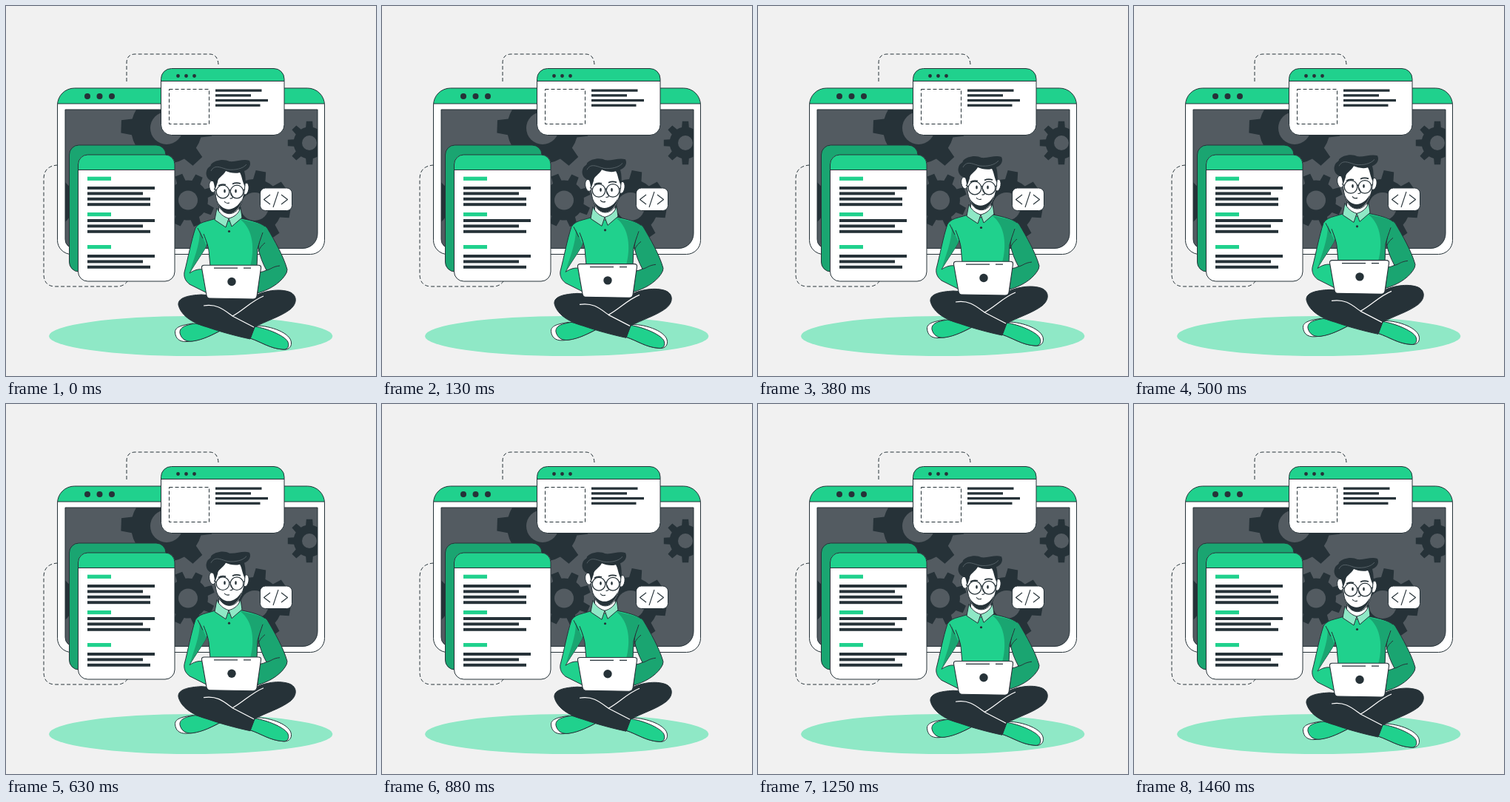
An HTML page with a canvas that plays this animation: 500x500 px, repeating every 1500 ms.

```html
<!DOCTYPE html>
<html lang="en">
<head>
<meta charset="utf-8">
<title>Developer at work</title>
<style>
  html, body { margin: 0; width: 100%; height: 100%; overflow: hidden; background: #f1f1f1; }
  canvas { display: block; width: 500px; height: 500px; }
</style>
</head>
<body>
<canvas id="stage"></canvas>
<script>
const DARK = '#263238', GREEN = '#20d18d', SHADE = '#1aa571', MINT = '#8fe8c6',
      GRAY = '#535b61', WHITE = '#fff', BACK = '#f1f1f1';
const LOOP = 1500, STEP = LOOP / 36, RISE = 10;

const canvas = document.getElementById('stage');
const ctx = canvas.getContext('2d');
const ratio = window.devicePixelRatio || 1;
canvas.width = canvas.height = 500 * ratio;

function paint(path, fill, stroke = DARK, width = 1) {
  if (fill) { ctx.fillStyle = fill; ctx.fill(path); }
  if (stroke) { ctx.strokeStyle = stroke; ctx.lineWidth = width; ctx.stroke(path); }
}
const shape = (d, fill, stroke, width) => paint(new Path2D(d), fill, stroke, width);
const line = (d, color = DARK, width = 1) => shape(d, null, color, width);

function oval(x, y, rx, ry, fill, stroke = null, width = 1, turn = 0) {
  const p = new Path2D();
  p.ellipse(x, y, rx, ry, turn, 0, Math.PI * 2);
  paint(p, fill, stroke, width);
}
const dot = (x, y, r, fill = DARK) => oval(x, y, r, r, fill);

function box(x, y, w, h, radius) {
  const p = new Path2D();
  p.roundRect(x, y, w, h, radius);
  return p;
}

function bar(x, y, right, h, color = DARK) {
  ctx.fillStyle = color;
  ctx.fillRect(x, y, right - x, h);
}

function dashed(d) {
  ctx.setLineDash([5, 3]);
  line(d);
  ctx.setLineDash([]);
}

// Panel with a coloured header strip
function panel(x, y, w, h, radius, header) {
  const p = box(x, y, w, h, radius);
  paint(p, WHITE, null);
  ctx.save();
  ctx.clip(p);
  bar(x, y, x + w, header, GREEN);
  ctx.restore();
  line(`M${x} ${y + header}h${w}`);
  paint(p);
}

function gear(x, y, outer, inner, hole, degrees) {
  const p = new Path2D(), pitch = Math.PI / 4;
  for (let i = 0; i < 8; i++) {
    const a = degrees * Math.PI / 180 + i * pitch;
    for (const [r, k] of [[inner, -.29], [outer, -.18], [outer, .18], [inner, .29]])
      p.lineTo(x + r * Math.cos(a + k * pitch), y + r * Math.sin(a + k * pitch));
    p.arc(x, y, inner, a + .29 * pitch, a + .71 * pitch);
  }
  p.closePath();
  paint(p, DARK, null);
  dot(x, y, hole, GRAY);
}

function drawMonitor() {
  dashed('M163 102V77Q163 65 175 65H275Q286 65 287 79');
  dashed('M70 215Q51 216 51 234V362Q51 379 67 379H152Q160 378 164 372');
  panel(69.5, 111, 361, 224.5, [23, 23, 19, 19], 21);
  [110, 126.5, 143].forEach(x => dot(x, 122, 4));

  const screen = box(80, 140, 341, 187.5, [0, 0, 20, 12]);
  paint(screen, GRAY, null);
  ctx.save();
  ctx.clip(screen);
  gear(217, 165, 62, 48, 22, 2);
  gear(246, 262.5, 36.5, 27, 13, -65.5);
  gear(336, 271, 49, 37, 19, -80);
  gear(410, 185, 29.5, 21.5, 10, 0);
  gear(56, 265, 42, 36, 8, 20);
  ctx.restore();
  paint(screen);
}

function drawPopup() {
  panel(209.5, 84.5, 166.5, 90, 14, 17);
  [232.5, 243.5, 254.5].forEach(x => dot(x, 94.5, 2.4));
  dashed('M220.5 112.5H274.5V159.5H220.5Z');
  [345.5, 331, 354, 343.5].forEach((right, i) => bar(283, 112.5 + i * 6.7, right, 3.3));
}

function drawPages() {
  paint(box(85.5, 188, 130.5, 171, 13), SHADE);
  panel(97.5, 201, 130.5, 171, 13, 20.5);
  const widths = [201, 185, 195, 195];
  for (const [head, top, count] of [[230.7, 244, 4], [279, 288, 3], [323, 336, 3]]) {
    bar(110, head, 142, 5.2, GREEN);
    for (let i = 0; i < count; i++) bar(110, top + i * 7.4, widths[i], 4);
  }
}

function drawCodeBubble() {
  paint(box(343.5, 246, 43, 30.5, 7), WHITE);
  line('M357 255L348.5 261.5L357 268M368 251L361 272M372 255L380.5 261.5L372 268', DARK, 1.1);
}

function drawLegs() {
  shape('M252 429C240 431 228 433 228.5 441C229 449 234 454 244 453.5C262 453 278 445 291 438Z', WHITE);
  shape('M256 429C243 431 234 434 235 442C237 450 243 454 252 453C267 451 279 444 291 438Z', GREEN);
  shape('M338 432C358 432 385 442 385.5 455C386 462 380 465 374 464C357 463 345 454 330 449Z', WHITE);
  shape('M336 433C354 436 375 445 380.5 453C384 460 380 465 374 464C357 463 345 454 330 449Z', GREEN);
  shape('M233 404C232 394 246 391 264 390L330 395C344 386 366 381 382 386C394 390 394 402 384 410C371 420 350 426 336 434L330 450C311 446 289 440 272 434C250 428 236 417 233 404Z', DARK);
  line('M267 405C286 402 295 411 306 419L335 434M306 419C321 411 331 399 348 392', WHITE, 1.2);
}

function drawArms() {
  // The space between each arm and the torso stays open
  shape('M264 293Q258 296 256 300C250 318 246 341 241 360C240 367 243 372 248 376L272 388L266 356C260 355 254 357 248 361C256 347 266 334 272 322Z', GREEN);
  shape('M262 303C266 313 269 319 271 324C266 334 256 347 248 361C253 343 262 324 262 303Z', SHADE, null);
  shape('M346 296Q351 297 353 300C363 317 375 338 380 356Q380 360 377 364C369 376 354 384 340 388L342 360Q348 359 352 357C347 348 343 338 341 327Z', SHADE);
  line('M352 357C358 356 360 352 370 351');
}

function drawTorso() {
  shape('M284 287C275 290 268 291 262 294L268 310C271 318 273 324 274 330L276 352H339L340 328C342 318 345 308 350 298C344 293 332 290 318 287Z', GREEN, null);
  shape('M316 288C328 291 342 293 350 298C345 308 342 318 340 328L339 352H330C336 330 335 302 316 288Z', SHADE, null);
  line('M284 287C275 290 268 291 262 294M318 287C332 290 344 293 350 298M259 300L266 314M267 308C271 318 273 324 274 330L276 352M347 306C344 315 342 320 340 328L339 352M350 320C345 324 343 327 341 332');
  shape('M288 268L287 281L301 291L316 280L314 268Z', WHITE);
  shape('M285 273L282 289L297 299L301 287C294 285 288 280 285 273Z', MINT);
  shape('M317 272L319 286L305 298L301 287C309 285 315 280 317 272Z', MINT);
  dot(301.5, 304.5, 1.6);
}

function drawHead() {
  oval(279, 244, 4.3, 8, WHITE, DARK, 1, -.15);
  oval(324, 247, 4, 8, WHITE, DARK, 1, .15);
  shape('M282 235C282 253 284 265 289 273C296 283 307 283 314 274C320 265 323 253 323 236L316 220H292Z', WHITE);
  shape('M285 262C291 278 309 280 319 261C317 271 310 280 302 280.5C293 281 288 272 285 262Z', DARK, null);
  shape('M283 247L280 237C273 236 269 229 271 223C273 216 277 218 277 214C282 208 295 206 302 210C311 211 321 206 329 209C332 215 328 221 322 223C324 230 324 237 323 244C319 237 319 230 316 225C309 227 302 225 297 223C293 230 286 232 286 238Z', DARK, null);
  line('M277 223C282 213 291 219 300 221C310 222 320 220 325 214', '#69747a', .7);
  line('M287 243Q291 240 297 241.5M306 240.5Q311 238 317 240', DARK, 1.7);
  oval(295.5, 250, 1.3, 2.6, DARK);
  oval(310.5, 250, 1.3, 2.6, DARK);
  oval(293, 251, 8.8, 8.8, null, DARK, 1.2);
  oval(312, 251, 8.8, 8.8, null, DARK, 1.2);
  line('M301.5 249.5Q302.5 248 303.5 249.5M284 249L281 247M321 249L323 247', DARK, 1.1);
  line('M303 251L306.5 258Q306 260.5 302.5 260M295 264C297 267 299 267 302 266', DARK, 1.1);
}

function drawLaptop() {
  shape('M268 350.3H341Q345 350.3 344.5 354L339 392Q338 396 334 396L275 395Q272 395 271 391L264.5 354Q264 350.3 268 350.3Z', WHITE, DARK, 1.1);
  line('M281 354.2H313M321 354.2H331', DARK, 1.2);
  dot(305, 372.5, 5.7);
}

function draw(now) {
  const frame = Math.floor((now % LOOP + 4) / STEP) % 36;
  const phase = (frame + .5) * STEP / LOOP;
  const lift = RISE * (1 - Math.abs(2 * phase - 1));

  ctx.setTransform(ratio, 0, 0, ratio, 0, 0);
  ctx.lineJoin = 'round';
  bar(0, 0, 500, 500, BACK);
  oval(249.7, 446, 191.7, 27, MINT);
  drawMonitor();
  drawPopup();
  drawPages();
  drawCodeBubble();

  ctx.translate(0, .3 - lift);
  drawLegs();
  drawArms();
  drawTorso();
  drawHead();
  drawLaptop();
}

const start = performance.now();
function tick() {
  draw(performance.now() - start);
  requestAnimationFrame(tick);
}
tick();
</script>
</body>
</html>
```
